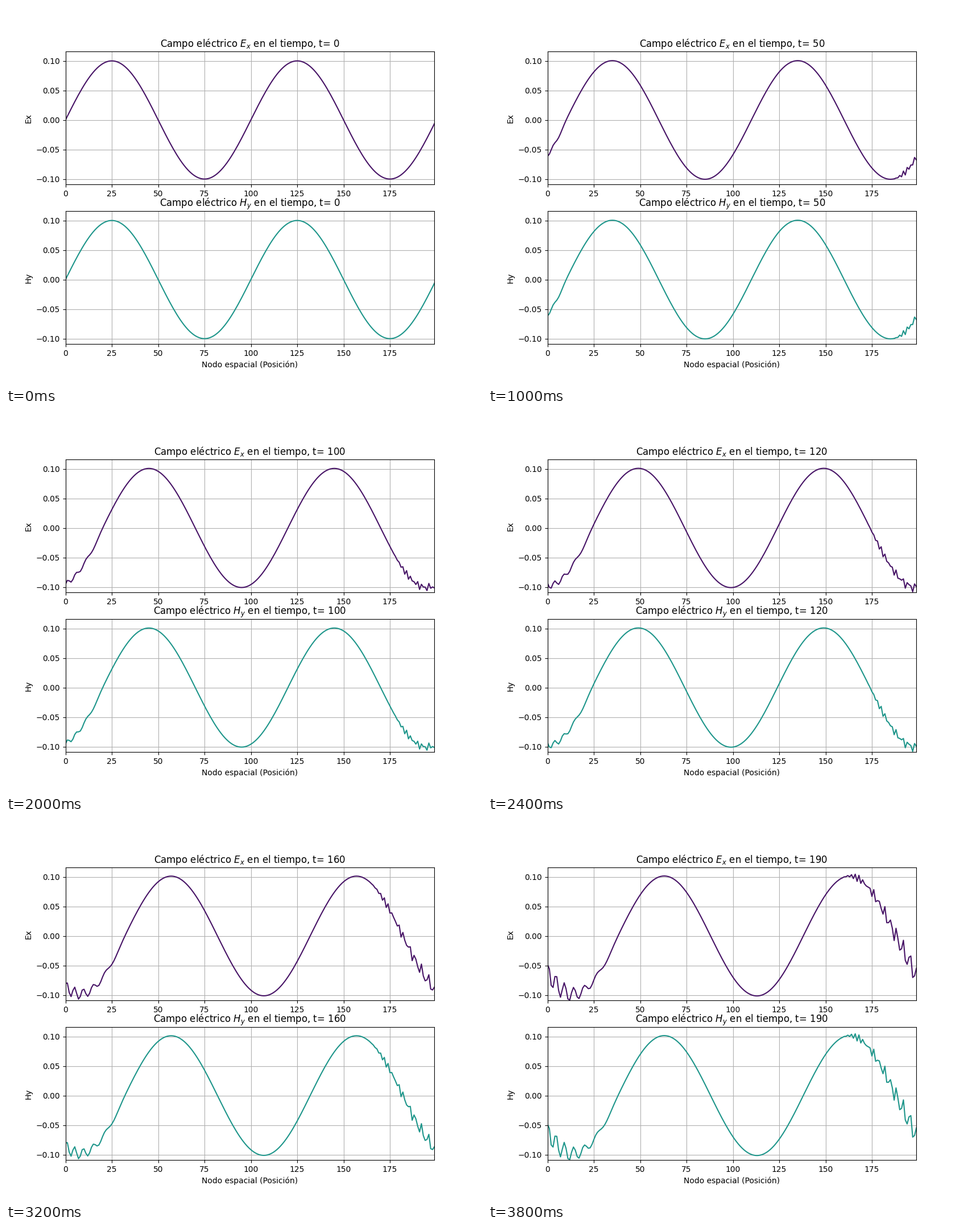
These frames come from a looping animation (837x669 px, 4 s). A matplotlib script:

```python
import numpy as np
import matplotlib.pyplot as plt
from matplotlib.animation import FuncAnimation

NODES = 200
FRAMES = 20
STEPS = 10          # time steps per frame
COURANT = 0.2


def rate(f):
    """Central difference; both end nodes share the wrapped stencil."""
    d = np.empty_like(f)
    d[1:-1] = f[2:] - f[:-2]
    d[0] = d[-1] = f[1] - f[-2]
    return d * COURANT / 2


def simulate():
    ex = 0.1 * np.sin(2 * np.pi * np.arange(NODES) / 100)
    hy = ex.copy()
    states = []
    for n in range(FRAMES * STEPS):
        if n % STEPS == 0:
            states.append((ex, hy))
        ex, hy = ex - rate(hy), hy - rate(ex)
    return states


states = simulate()
nodes = np.arange(NODES)

plt.rcParams["font.family"] = "DejaVu Sans"
# The small margin keeps the pixel size from truncating to 836.
fig, axes = plt.subplots(2, 1, figsize=(8.3701, 6.6901), dpi=100)
fields = [("Ex", "$E_x$", "#481567"), ("Hy", "$H_y$", "#1F968B")]

lines = []
for ax, (label, _, color) in zip(axes, fields):
    lines += ax.plot(nodes, states[0][0], color=color, lw=1.5)
    ax.set_xlim(0, NODES - 1)
    ax.set_ylim(-0.1094, 0.1157)
    ax.set_ylabel(label)
    ax.grid(True)
axes[1].set_xlabel("Nodo espacial (Posición)")


def update(i):
    for ax, line, (_, symbol, _), data in zip(axes, lines, fields, states[i]):
        line.set_ydata(data)
        ax.set_title(f"Campo eléctrico {symbol} en el tiempo, t= {i * STEPS}")
    return lines


anim = FuncAnimation(fig, update, frames=FRAMES, interval=200, repeat=True,
                     repeat_delay=0, blit=False)
plt.show()
```
